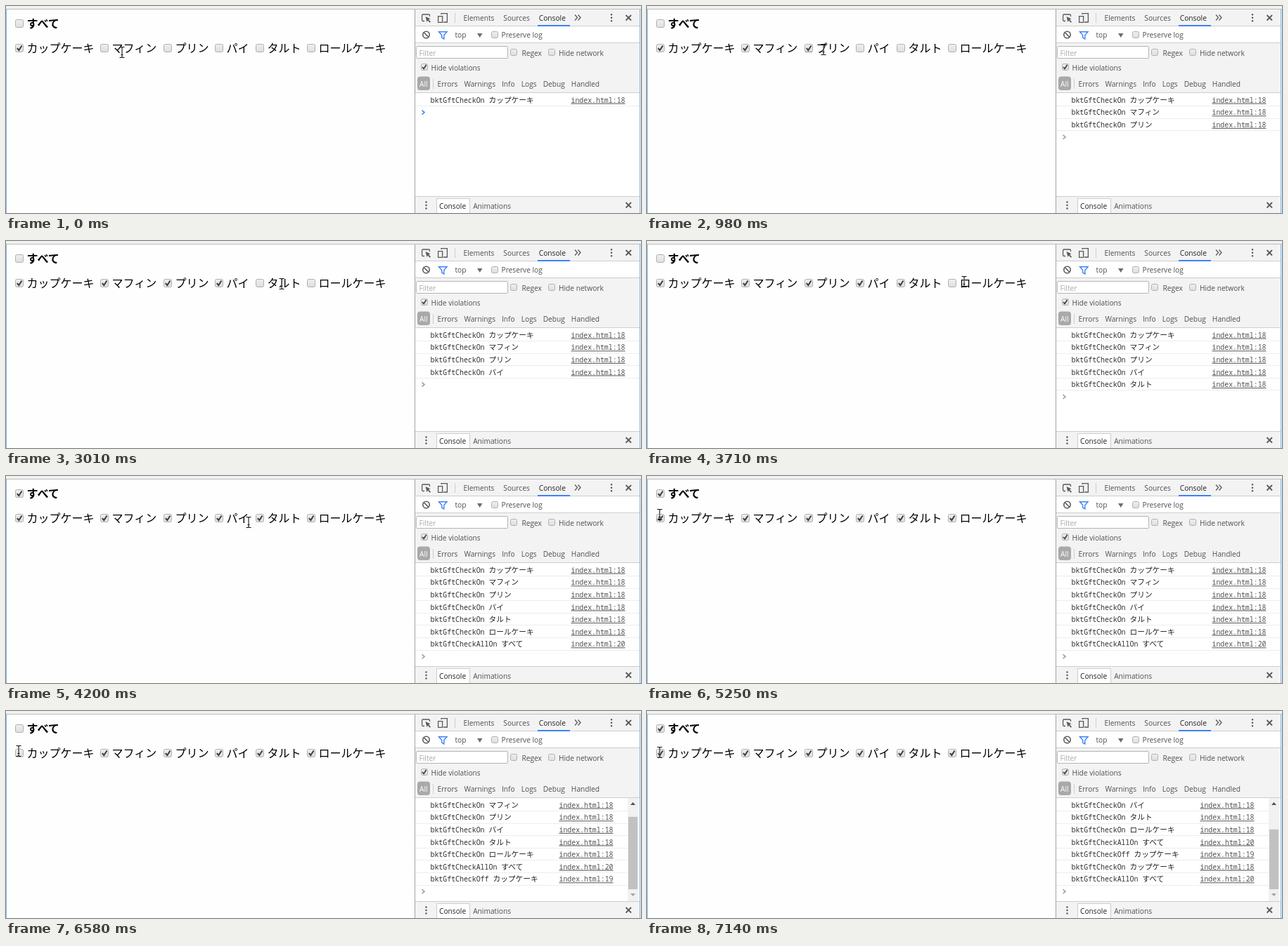
Write an HTML page that moves like this. It is 903 px wide and 295 px high and loops after 8000 ms.

```html
<!DOCTYPE html>
<html lang="ja">
<head>
<meta charset="utf-8">
<title>Checkbox events</title>
<style>
  html, body { margin: 0; width: 100%; height: 100%; overflow: hidden; background: #fefefe; }
  svg { display: block; }
  .ui { font: 10.2px "Open Sans", "Noto Sans", sans-serif; fill: #505050; }
  .page { font: 16px "Noto Sans CJK JP", "Noto Sans CJK", sans-serif; fill: #000; }
  .all { font-weight: 700; }
  .mono { font: 9.88px "Noto Sans Mono", "DejaVu Sans Mono", monospace; fill: #303030; }
  .kana { font: 10.7px "Noto Sans CJK JP", "Noto Sans CJK", sans-serif; fill: #222; }
  .link { text-anchor: end; text-decoration: underline; fill: #545454; }
  .icon { fill: none; stroke: #5a5a5a; stroke-width: 1.3; }
  .box { fill: url(#face); stroke: #b0b0b0; }
  .tick { fill: none; stroke: #3c3c3c; stroke-width: 2; }
  .dark { fill: #222; }
  .pale { fill: #a9a9a9; }
  .white { fill: #fff; }
</style>
</head>
<body>
<svg width="903" height="295" viewBox="0 0 903 295">
  <defs>
    <linearGradient id="face" x2="0" y2="1">
      <stop offset="0" stop-color="#efefef"/><stop offset="1" stop-color="#dedede"/>
    </linearGradient>
  </defs>

  <!-- window frame -->
  <path fill="#f1f1f1" d="M0 0H903V4H0zM902 4h1v291h-1z"/>
  <path fill="#bdbdbd" d="M0 4H903v1H0z"/>
  <path fill="#7fb4ee" d="M0 5h1v290H0zM901 5h1v290h-1z"/>

  <!-- panel -->
  <path fill="#f3f3f3" d="M582 5H901V28H582zM582 53H901V123H582zM582 272H901V295H582z"/>
  <path fill="#fff" d="M582 29H901V52H582zM582 124H901V271H582z"/>
  <path fill="#a3a3a3" d="M581 5h1v290h-1z"/>
  <path fill="#cdcdcd" d="M582 28H901v1H582zM582 52H901v1H582zM582 123H901v1H582zM582 271H901v1H582zM638 10h1v14h-1zM607 104h1v14h-1z"/>
  <path fill="#3e82f7" d="M756 27h46v2h-46z"/>

  <!-- icons -->
  <g class="icon">
    <path d="M595 21.5H593Q591.6 21.5 591.6 20V13.5Q591.6 12 593 12H601Q602.5 12 602.5 13.5V15"/>
    <path d="M619 12V10.6H627.4V23H622M614.6 14.6H620.6V23.4H614.6z"/>
    <path d="M809 12.5l3.5 4l-3.5 4M813.5 12.5l3.5 4l-3.5 4"/>
    <path stroke-width="1.8" d="M881.5 13l7.5 7.5m0 -7.5l-7.5 7.5M881.5 280l7.5 7.5m0 -7.5l-7.5 7.5"/>
    <path stroke-width="1.6" d="M594.3 37.8l6.4 6.4M602.2 41a4.7 4.7 0 1 0 -9.4 0a4.7 4.7 0 1 0 9.4 0"/>
    <path stroke-width="2.6" stroke-linecap="round" stroke-dasharray="0 4.5" d="M861 12.3v9.1M597.5 279.5v9.1"/>
  </g>
  <path fill="#5a5a5a" d="M596.5 15L603.5 18.2L601 19.3L604 22.5L602.7 23.7L599.8 20.6L598.5 23z"/>
  <path fill="none" stroke="#3e82f7" stroke-width="1.4" d="M615.5 36.7H627L622.8 41.5V47L619.7 45V41.5z"/>
  <path fill="#6e6e6e" d="M670 39h7.5l-3.75 6z"/>

  <!-- filter, levels, drawer tab -->
  <rect x="583.5" y="57.5" width="130" height="17" rx="1" fill="#fff" stroke="#b4b4b4"/>
  <rect x="585" y="100.5" width="18" height="19.5" rx="4" fill="#a9a9a9"/>
  <path fill="#fff" stroke="#cdcdcd" d="M612.5 296V274.5H659.5V296"/>
  <g id="options"></g>
  <g id="labels"></g>

  <g id="page"></g>
  <g id="log"></g>
  <path id="prompt" fill="none" stroke-width="1.5" d="M591.5 -3L595 0L591.5 3"/>
  <g id="bar">
    <path fill="#f1f1f1" d="M884 124h15v147h-15z"/>
    <path fill="#505050" d="M888 134h7l-3.5 -4z"/>
    <path fill="#a3a3a3" d="M888 260h7l-3.5 4z"/>
    <rect id="thumb" x="885" width="13" fill="#c1c1c1"/>
  </g>
  <g id="cursor" fill="none">
    <path stroke="#fff" stroke-opacity=".6" stroke-width="2.4" d="M0 -6V6"/>
    <path stroke="#111" stroke-width="1.1" d="M-3.5 -7.5H-1L0 -6.5L1 -7.5H3.5M0 -6.5V6.5M-3.5 7.5H-1L0 6.5L1 7.5H3.5M-1.5 3.5H1.5"/>
  </g>
</svg>

<script>
const LOOP = 8000, STEP = 70;
const $ = id => document.getElementById(id);
const text = (cls, x, y, s) => `<text class="${cls}" x="${x}" y="${y}">${s}</text>`;
const square = (x, y, size) =>
  `<rect class="box" x="${x + .5}" y="${y + .5}" width="${size - 1}" height="${size - 1}" rx="2"/>`;
const tickMark = (x, y, k = 1) =>
  `<path class="tick" transform="translate(${x} ${y}) scale(${k})" d="M2.8 6.2l2.5 2.8l4.2 -6.5"/>`;

// words flow from x with an even gap; a leading * marks the selected one
const row = (x, y, gap, words) => text('ui', x, y, words.split('|').map((w, i) =>
  `<tspan dx="${i && gap}" class="${w[0] === '*' ? 'dark' : ''}">${w.replace('*', '')}</tspan>`).join(''));

$('labels').innerHTML =
  row(650.5, 20.8, 13, 'Elements|Sources|*Console') +
  row(638.5, 45, 50, 'top|Preserve log') +
  text('ui pale', 587.5, 71, 'Filter') +
  row(733.5, 71, 24, 'Regex|Hide network') +
  row(604.5, 92, 0, 'Hide violations') +
  text('ui white', 588, 115, 'All') +
  row(613.5, 115, 9, 'Errors|Warnings|Info|Logs|Debug|Handled') +
  row(616, 289, 10, '*Console|Animations');

$('options').innerHTML = square(690, 36, 10) + square(717, 61, 10) + square(771, 61, 10) +
  square(590, 82, 10) + tickMark(589.6, 81.7, .85);

// page: the first box stands alone, the others follow each other in a line
const names = ['すべて', 'カップケーキ', 'マフィン', 'プリン', 'パイ', 'タルト', 'ロールケーキ'];
let flow = 13;
$('page').innerHTML = names.map((name, i) => {
  const x = i ? Math.round(flow) : 13, y = i ? 54 : 19;
  if (i) flow += name.length * 16 + 25.4;
  return square(x, y, 12) +
    `<path class="press" fill="#8e8e8e" d="M${x + 1} ${y + 11}h10v1h-10z"/>` +
    tickMark(x, y) + text(i ? 'page' : 'page all', x + 16.5, y + 11.6, name);
}).join('');
const ticks = $('page').querySelectorAll('.tick');
const presses = $('page').querySelectorAll('.press');

// clicks as time, box
const clicks = [[0, 1], [350, 2], [980, 3], [1890, 4], [3080, 5], [3850, 6], [5320, 1], [7000, 1]];

// replays the clicks up to t: box 0 is on while all the others are
function replay(t) {
  const on = names.map(() => false), log = [];
  for (const [time, box] of clicks) {
    if (time > t) break;
    on[box] = !on[box];
    log.push({ event: on[box] ? 'On' : 'Off', box, line: on[box] ? 18 : 19 });
    on[0] = on.slice(1).every(Boolean);
    if (on[0]) log.push({ event: 'AllOn', box: 0, line: 20 });
  }
  return { on, log };
}

const ROW = 17.6, FIT = 7, CHAR = 5.93;

function drawLog(log) {
  const scrolled = log.length > FIT;
  const shown = log.slice(-FIT);
  $('log').innerHTML = shown.map(({ event, box, line }, i) => {
    const y = 137.7 + i * ROW, call = 'bktGftCheck' + event;
    return text('mono', 603.5, y, call) +
      text('kana', 603.5 + (call.length + 1) * CHAR, y, names[box]) +
      text('mono link', scrolled ? 863.5 : 880.5, y, 'index.html:' + line) +
      `<path fill="#ededed" d="M582 ${Math.round(142 + i * ROW)}H${scrolled ? 884 : 901}v1H582z"/>`;
  }).join('');
  $('prompt').setAttribute('transform', `translate(0 ${134 + shown.length * ROW})`);
  $('prompt').setAttribute('stroke', log.length > 1 ? '#8c9ab4' : '#3e82f7');
  $('bar').style.display = scrolled ? '' : 'none';
  const size = 980 / (log.length + 1.5);
  $('thumb').setAttribute('y', 254 - size);
  $('thumb').setAttribute('height', size);
}

// glides as start, end, x, y reached
const glides = [
  [0, 140, 165, 64], [490, 700, 251, 62], [1120, 1680, 323, 56], [2030, 2170, 400, 63],
  [2590, 2660, 392, 61], [3290, 3500, 451, 58], [4130, 4200, 345, 66], [4200, 4410, 138, 58],
  [4480, 4900, 18, 55], [6510, 6650, 18, 59]
];

function cursorAt(t) {
  let x = 165, y = 66;
  for (const [start, end, toX, toY] of glides) {
    const p = Math.min(1, Math.max(0, (t - start) / (end - start)));
    const ease = p * p * (3 - 2 * p);
    x += (toX - x) * ease;
    y += (toY - y) * ease;
  }
  return `translate(${Math.round(x)} ${Math.round(y)})`;
}

const show = (el, on) => { el.style.display = on ? '' : 'none'; };
let drawn = 0;

function render(t) {
  const { on, log } = replay(t);
  on.forEach((checked, i) => {
    show(ticks[i], checked);
    show(presses[i], clicks.some(([time, box]) => box === i && time && Math.abs(t - time) < STEP));
  });
  if (log.length !== drawn) {
    drawLog(log);
    drawn = log.length;
  }
  $('cursor').setAttribute('transform', cursorAt(t));
}

const begin = performance.now();
function tick() {
  const t = (performance.now() - begin) % LOOP;
  render(Math.floor(t / STEP + .01) * STEP);
  requestAnimationFrame(tick);
}
tick();
</script>
</body>
</html>
```
